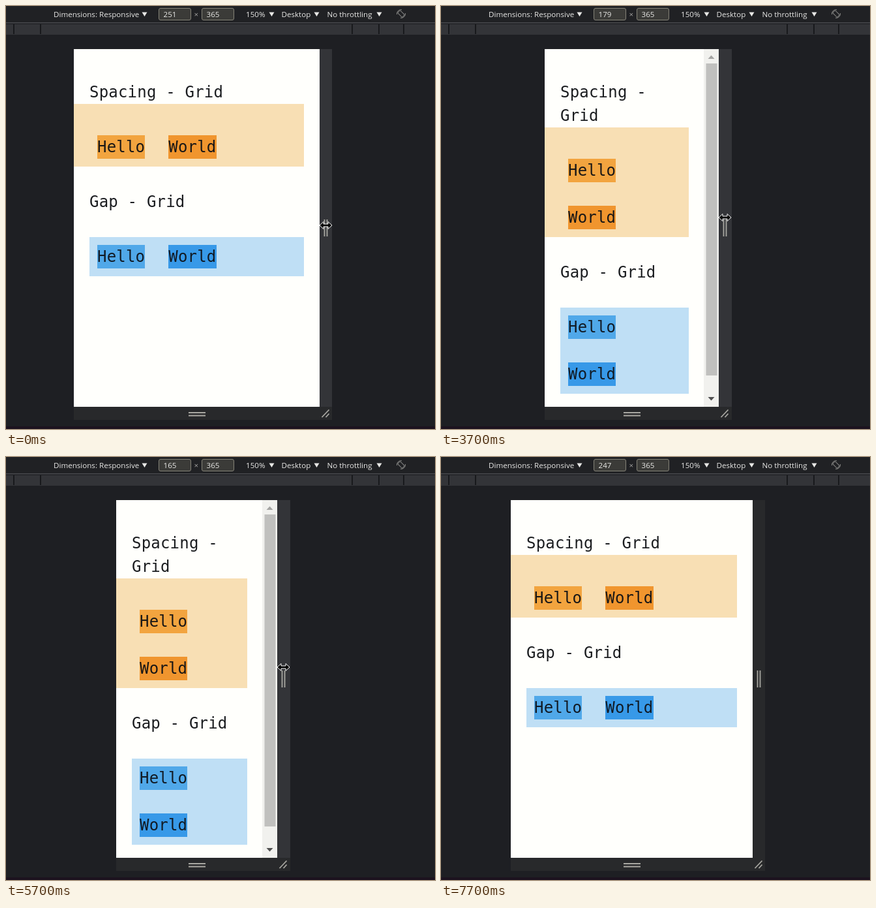
An HTML page that plays this animation: 658 px wide and 648 px high, repeating every 8.4 s.

```html
<!DOCTYPE html>
<html lang="en">
<head>
<meta charset="utf-8">
<title>Responsive spacing and gap</title>
<style>
  html, body { margin: 0; width: 100%; height: 100%; overflow: hidden; background: #1e1f23; }
  #stage { position: relative; width: 658px; height: 648px; overflow: hidden; background: #1e1f23; }
  #stage > svg { position: absolute; left: 0; top: 0; }
  .bar text { font: 11.6px "Open Sans", "Noto Sans", sans-serif; fill: #e8e8e6; }
  .bar rect.field { fill: #3b3b38; stroke: #858378; }

  #page { position: absolute; top: 66px; height: 548px; box-sizing: border-box; overflow: hidden;
    padding: 48px 24px 0; background: #fffffc; color: #1b1d20;
    font: 24px/36px "DejaVu Sans Mono", monospace; letter-spacing: .2px; }
  #page p { margin: 0; }
  .row { display: flex; gap: 36px; padding: 12px; align-items: flex-start; }
  .stacked .row { flex-direction: column; }
  .spacing { margin: 0 0 36px -24px; padding: 48px 12px 12px 36px; background: #f8dfb4; }
  .gap { margin-top: 36px; background: #bfdff5; }
  .row span { color: #191716; }
  .spacing span { background: #f2a43f; }
  .spacing span + span { background: #f0952e; }
  .gap span { background: #50a8e9; color: #111a24; }
  .gap span + span { background: #3799e8; }

  #scroll { display: none; position: absolute; right: 0; top: 0; width: 23px; height: 548px; background: #f1f1ee; }
  .stacked #scroll { display: block; }

  #side, #foot { position: absolute; }
  #side { top: 66px; height: 548px; }
  #foot { top: 614px; height: 20px; background: #28292b; }
</style>
</head>
<body>
<div id="stage">
  <svg class="bar" width="658" height="648">
    <rect width="658" height="25" fill="#202124"/>
    <rect y="25" width="658" height="1.5" fill="#494a4e"/>
    <rect y="28" width="658" height="16" fill="#333438"/>
    <path d="M12 28v15M53 28v15M531 28v15M572 28v15M610 28v15" stroke="#18191c" stroke-width="2"/>
    <rect y="644" width="658" height="4" fill="#1c121e"/>
    <rect class="field" x="234.5" y="3.5" width="49" height="18" rx="2.5"/>
    <rect class="field" x="300.5" y="3.5" width="49" height="18" rx="2.5"/>
    <text x="73" y="17">Dimensions: Responsive</text>
    <text id="width" x="241.5" y="17"></text>
    <text x="288.5" y="17" style="fill:#a3a3a1">×</text>
    <text x="307.5" y="17">365</text>
    <text x="368" y="17">150%</text>
    <text x="422.5" y="17">Desktop</text>
    <text x="492.5" y="17">No throttling</text>
    <path d="M208.5 9.5h8l-4 6.5zM403.500 9.500h8l-4 6.500zM472.500 9.500h8l-4 6.500zM568.500 9.500h8l-4 6.500z" fill="#e8e8e6"/>
    <g transform="translate(606 12)" fill="none" stroke="#8b8b89">
      <rect x="-2.700" y="-5" width="5.400" height="10" rx="1" transform="rotate(-45)"/>
      <path d="M-6.500 1A6.500 6.500 0 0 1 1 -6.300M6.500 -1A6.500 6.500 0 0 1 -1 6.300"/>
    </g>
  </svg>

  <div id="page">
    <p>Spacing - Grid</p>
    <div class="row spacing"><span>Hello</span><span>World</span></div>
    <p>Gap - Grid</p>
    <div class="row gap"><span>Hello</span><span>World</span></div>
    <svg id="scroll">
      <rect x="3.500" y="22" width="17" height="478" fill="#c0c0be"/>
      <path d="M6.500 15h10l-5 -5.500z" fill="#a4a4a2"/>
      <path d="M6.500 533h10l-5 5.500z" fill="#505050"/>
    </svg>
  </div>
  <div id="side"></div>
  <div id="foot"></div>

  <svg width="658" height="648">
    <path d="M280 623h26M280 627.500h26" stroke="#a9a8a2" stroke-width="1.800"/>
    <g id="grips" stroke="#a9a8a2" stroke-width="1.800">
      <path d="M7.500 327v26M11.500 327v26"/>
      <path d="M3.500 630l11 -11.500M9.500 630l5 -5.500"/>
    </g>
    <path id="resize" d="M-9.500 0L-3.500 -5.500V-2H3.500V-5.500L9.500 0L3.500 5.500V2H-3.500V5.500Z" fill="#050505" stroke="#fff"/>
    <path id="arrow" d="M.500 .500V15L4 11.700L6.500 17.300L9 16.200L6.500 10.800H11Z" fill="#050505" stroke="#fff"/>
  </svg>
</div>

<script>
const LOOP = 8400, STEP = 100, CENTER = 292.4;
const $ = id => document.getElementById(id);

// [start ms, viewport widths at 100 ms steps, layout lag in px]
const drags = [
  [0, [251]],
  [700, [244, 228, 212, 198, 186, 180, 176, 173, 171]],
  [1700, [167]],
  [1900, [165, 164]],
  [3200, [165, 166, 167]],
  [3600, [172, 178.5, 187, 197, 205, 210]],
  [4400, [206, 199, 191, 184, 178, 174, 172, 170, 167], 3],
  [5300, [167, 166]],
  [5700, [165]],
  [5900, [167, 171, 176, 181, 186, 192, 198, 203, 208]],
  [6800, [218, 230, 241, 247]]
];
const pointerY = [[0, 336], [700, 335], [1100, 329], [1700, 324], [4800, 324], [6300, 321], [7100, 322]];
const exit = [[455, 270], [330, 150], [131, 20]];
const EXIT_START = 7400, RELEASE = 7100;

// The scrollbar keeps the narrow layout alive longer while widening.
let narrow = false;
const steps = drags.flatMap(([start, widths, lag = 0]) => widths.map((w, i) => {
  narrow = w < (narrow ? 185 : 170);
  return { t: start + i * STEP, w, narrow, lag: narrow || i === widths.length - 1 ? 0 : lag };
}));

function along(points, t) {
  const i = points.findIndex(p => p[0] > t);
  if (i < 0) return points[points.length - 1][1];
  const [t0, a] = points[i - 1], [t1, b] = points[i];
  return a + (b - a) * (t - t0) / (t1 - t0);
}

function span(el, left, right) {
  el.style.left = left + 'px';
  el.style.width = right - left + 'px';
}

function move(el, x, y) {
  el.setAttribute('transform', `translate(${x} ${y})`);
}

function draw(t) {
  const s = steps.findLast(step => step.t <= t);
  const left = Math.round(CENTER - .75 * s.w);
  const right = Math.round(CENTER + .75 * s.w);
  const outer = Math.round(CENTER + .75 * s.w + 19.65);
  const page = $('page');

  span(page, left, right);
  span($('side'), right, outer);
  span($('foot'), left, outer);
  page.className = s.narrow ? 'stacked' : '';
  page.style.paddingRight = 24 + (s.narrow ? 22.5 : s.lag) + 'px';
  $('width').textContent = Math.round(s.w);
  $('side').style.background = t < RELEASE ? '#333438' : '#28292b';
  move($('grips'), right, 0);

  const leaving = exit[Math.floor((t - EXIT_START) / STEP)];
  $('resize').style.display = t < EXIT_START ? '' : 'none';
  $('arrow').style.display = leaving ? '' : 'none';
  move($('resize'), right + 9.5, Math.round(along(pointerY, s.t)));
  if (leaving) move($('arrow'), ...leaving);
}

const begin = performance.now();
function tick() {
  draw((performance.now() - begin) % LOOP);
  requestAnimationFrame(tick);
}
tick();
</script>
</body>
</html>
```
